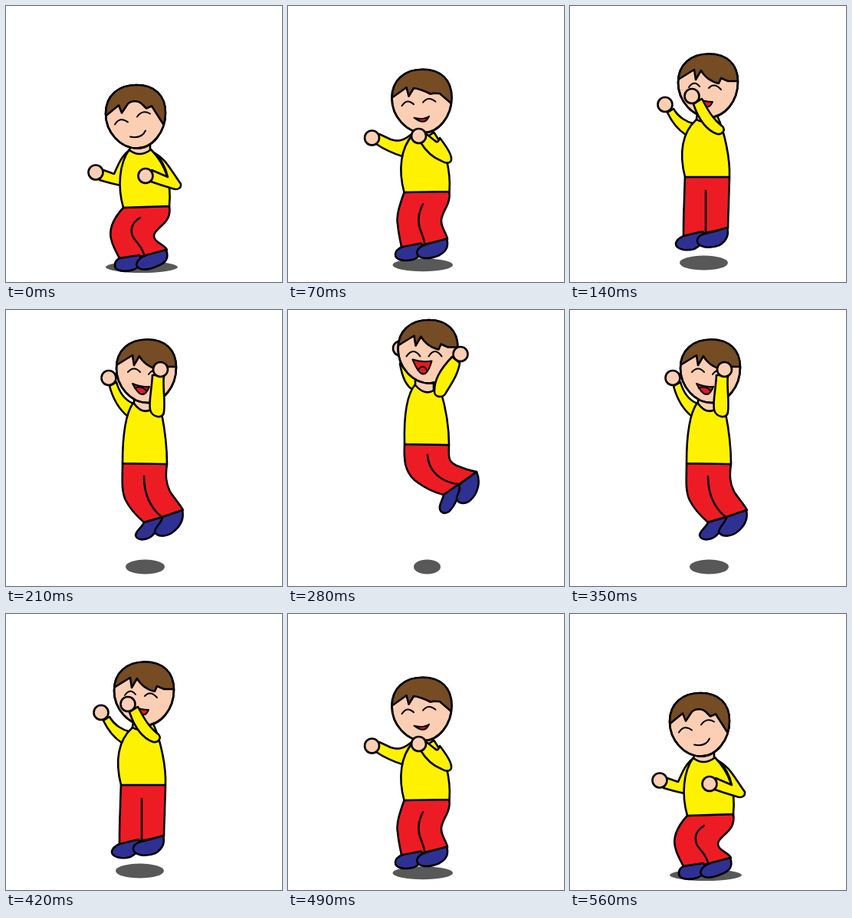
Write an HTML page that moves like this. It is 360 px wide and 360 px high and loops after 0.77 s.

```html
<!DOCTYPE html>
<html lang="en">
<head>
<meta charset="utf-8">
<title>Jumping boy</title>
<style>
  html, body { margin: 0; width: 100%; height: 100%; overflow: hidden; background: #fff; }
  svg { display: block; width: 100%; height: 100%; }
</style>
</head>
<body>
<svg id="stage" viewBox="0 0 360 360"></svg>
<script>
const STEP = 70;
const SKIN = '#fccfb4', HAIR = '#754c24', YELLOW = '#fff200', RED = '#ed1c24', BLUE = '#2e3192';
const SKULL = 'M-39 -4C-39 -28 -22 -41.5 1 -41.5C25 -41.5 39 -28 39 -5C39 20 22 41 2 41C-20 41 -39 20 -39 -4Z';

// Body parts use stage coordinates; hair, eyes, mouth and tongue are relative to the head centre.
const crouch = {
  shadow: '177 340.5 47 7.5',
  head: '169 144.5',
  hair: 'M-39 -1L-22 -15L-18 -5L-12 -14C-8 -22 4 -22 9 -16L14 -11L21 -14L37 11',
  eyes: 'M-27 10Q-20 -1 -10 7M2 0Q9 -10 19 -4',
  mouth: 'M-7 26Q8 29 13 18Q8 29 -7 26Z',
  tongue: '',
  neck: 'M163 182L161 188Q174 198 188 188L188 180',
  torso: 'M161 187C148 205 145 235 153 263L213 261C216 230 209 208 189 187Z',
  legs: 'M153 263C142 275 132 290 138 307C140 315 146 325 148 329L180 326L210 318C207 311 192 308 193 299C195 288 217 284 213 261Z',
  inseam: 'M175 276C160 285 162 298 169 306Q177 315 180 324',
  shoeL: 'M148 329Q160 327 174 325C179 332 176 340 166 344C154 348 141 345 142 338Q142 332 148 329Z',
  shoeR: 'M170 337C172 329 181 325 190 323L209 318C213 330 208 335 198 339C185 345 172 346 170 337Z',
  armL: 'M161 188C150 196 146 208 141 219L127 214L122 227Q135 231 149 234',
  armR: 'M190 214L211 223C208 210 202 199 193 191C208 200 210 206 228 232C229 239 222 240 217 238Q203 234 189 229Z',
  fistL: '117 217',
  fistR: '182 221.5'
};

const rise = {
  shadow: '174.5 335 31.5 9.5',
  head: '180 104',
  hair: 'M-39 -8L-18 -21L-16 -8L-9 -20C-5 -12 4 -5 14 -3L17 -10L26 -6L39 -6',
  eyes: 'M-25 2Q-18 -8 -11 1M1 3Q8 -5 17 5',
  mouth: 'M-13 17Q-4 21 6 21Q0 36 -13 17Z',
  tongue: '',
  neck: 'M166 140L165 148Q176 156 190 143L190 138',
  torso: 'M165 148C146 165 142 192 150 223L208 223C209 200 202 165 192 143Z',
  legs: 'M150 223C149 245 149 260 148.5 265C148 280 148 290 148 300L175 296L206 290C206 280 206.5 270 207 260C207 245 208 235 208 223Z',
  inseam: 'M177 241C177 260 177 270 177 280Q177 290 177 297',
  shoeL: 'M148 300Q160 297 173 294C178 305 170 313 162 317C150 320 138 317 138 310Q139 304 148 300Z',
  shoeR: 'M166 305C168 297 178 297 188 294L205 289C208 300 203 307 195 312C182 317 165 315 166 305Z',
  armL: 'M160 153C152 151 142 145 137 137L135 134L127 139Q136 158 151 168',
  armR: 'M172 121L178 132C182 139 186 145 191 150C194 153 196 155 199 157C203 162 199 168 192 167Q172 160 161 128Z',
  fistL: '124 128.5',
  fistR: '159 117.5'
};

const float = {
  shadow: '181.5 335 25.5 9.5',
  head: '183 80',
  hair: rise.hair,
  eyes: 'M-24 1Q-16 -8 -8 1M3 4Q10 -6 18 4',
  mouth: 'M-18 16Q-7 21 4 20Q-5 42 -18 16Z',
  tongue: 'M-15 22Q-7 18 0 25',
  neck: 'M167 114L167 122Q177 136 189 130L189 114',
  torso: 'M166 121C156 135 152 165 152 200L210 201C210 180 208 160 203 135L189 128Z',
  legs: 'M152 200C152 220 150 235 156 248C162 260 172 270 180 277L204 270L231 261C228 255 220 246 214 237C208 225 208 215 210 201Z',
  inseam: 'M180 217C180 235 185 255 203 270',
  shoeL: 'M180 277L204 270C203 280 198 288 190 295C182 301 171 301 169 294C169 288 178 283 180 277Z',
  shoeR: 'M204 270L230 261C233 275 226 284 216 291C206 297 196 295 194 289C195 282 203 278 204 270Z',
  armL: 'M166 122C156 118 148 108 144 94L135 99C140 118 148 130 159 139',
  armR: 'M191 85C190 105 186 120 188 130C190 140 205 143 206 133C208 118 204 100 206 85Z',
  fistL: '134 88.5',
  fistR: '201.5 77.5'
};

const peak = {
  shadow: '181.5 335 17.5 9.5',
  head: '182.5 54.5',
  hair: rise.hair,
  eyes: 'M-28 6Q-19 -7 -10 6M1 6Q9 -7 18 6',
  mouth: 'M-20 10Q-8 14 5 12Q-5 47 -20 10Z',
  tongue: 'M-13 24Q-6 14 -1 25',
  neck: 'M166 90L166 98Q178 112 190 105L190 90',
  torso: 'M166 97C155 110 151 140 152 175L210 176C210 150 205 125 199 105L190 103Z',
  legs: 'M152 175C151 195 152 210 165 222C178 232 190 238 203 241L222 228L246 211C240 210 230 207 220 203C210 198 209 195 210 176Z',
  inseam: 'M182 189C183 210 200 225 222 227',
  shoeL: 'M203 241L223 227C225 240 218 255 210 263C202 268 197 262 198 256C199 250 202 247 203 241Z',
  shoeR: 'M223 228L246 211C252 225 247 240 238 248C230 255 220 252 220 245C222 237 226 235 223 228Z',
  armL: 'M146 70C149 88 155 100 163 104L168 95',
  armR: 'M214 61L224 69C222 84 212 98 206 108C202 116 190 114 191 105C191 91 198 78 214 61Z',
  fistL: '146.5 50',
  fistR: '225 57.5'
};

// Blends two poses whose paths share the same commands.
function blend(a, b, k) {
  const pose = {};
  for (const part in a) {
    const ends = b[part].match(/-?[\d.]+/g);
    let i = 0;
    pose[part] = a[part].replace(/-?[\d.]+/g, n => +n + (ends[i++] - n) * k);
  }
  return pose;
}

const launch = {
  ...blend(crouch, rise, 0.5),
  armL: 'M160 168C148 178 140 176 134 174L119 167L115 180Q130 190 149 196',
  armR: 'M178 165L192 176C194 178 196 178 198 172C204 180 212 190 213 198C214 206 206 206 200 202Q184 196 173 178Z',
  fistL: '109.5 172'
};

const path = (d, fill = 'none') => `<path d="${d}" fill="${fill}"/>`;
const ellipse = (values, fill) => {
  const [cx, cy, rx = 9.5, ry = 9.5] = values.split(' ');
  return `<ellipse cx="${cx}" cy="${cy}" rx="${rx}" ry="${ry}" fill="${fill}"/>`;
};

function render(p) {
  return `
    <clipPath id="skull">${path(SKULL)}</clipPath>
    ${ellipse(p.shadow, '#585858')}
    <g stroke="#000" stroke-width="2.6" stroke-linejoin="round" stroke-linecap="round">
      ${path(p.armL, YELLOW)}${ellipse(p.fistL, SKIN)}
      ${path(p.legs, RED)}${path(p.inseam)}
      ${path(p.shoeL, BLUE)}${path(p.shoeR, BLUE)}
      ${path(p.torso, YELLOW)}${path(p.neck, SKIN)}
      <g transform="translate(${p.head})">
        ${path(SKULL, SKIN)}
        <g clip-path="url(#skull)">${path(p.hair + 'L50 -50L-50 -50Z', HAIR)}</g>
        ${path(SKULL)}
        <g stroke-width="2">${path(p.eyes)}${path(p.mouth, '#e01b22')}${path(p.tongue)}</g>
      </g>
      ${path(p.armR, YELLOW)}${ellipse(p.fistR, SKIN)}
    </g>`;
}

const sequence = [crouch, launch, rise, float, peak, float, rise, launch, crouch, crouch, crouch];
const stage = document.getElementById('stage');
let shown;

function frame() {
  const pose = sequence[Math.floor(performance.now() / STEP) % sequence.length];
  if (pose !== shown) stage.innerHTML = render(shown = pose);
  requestAnimationFrame(frame);
}
frame();
</script>
</body>
</html>
```
